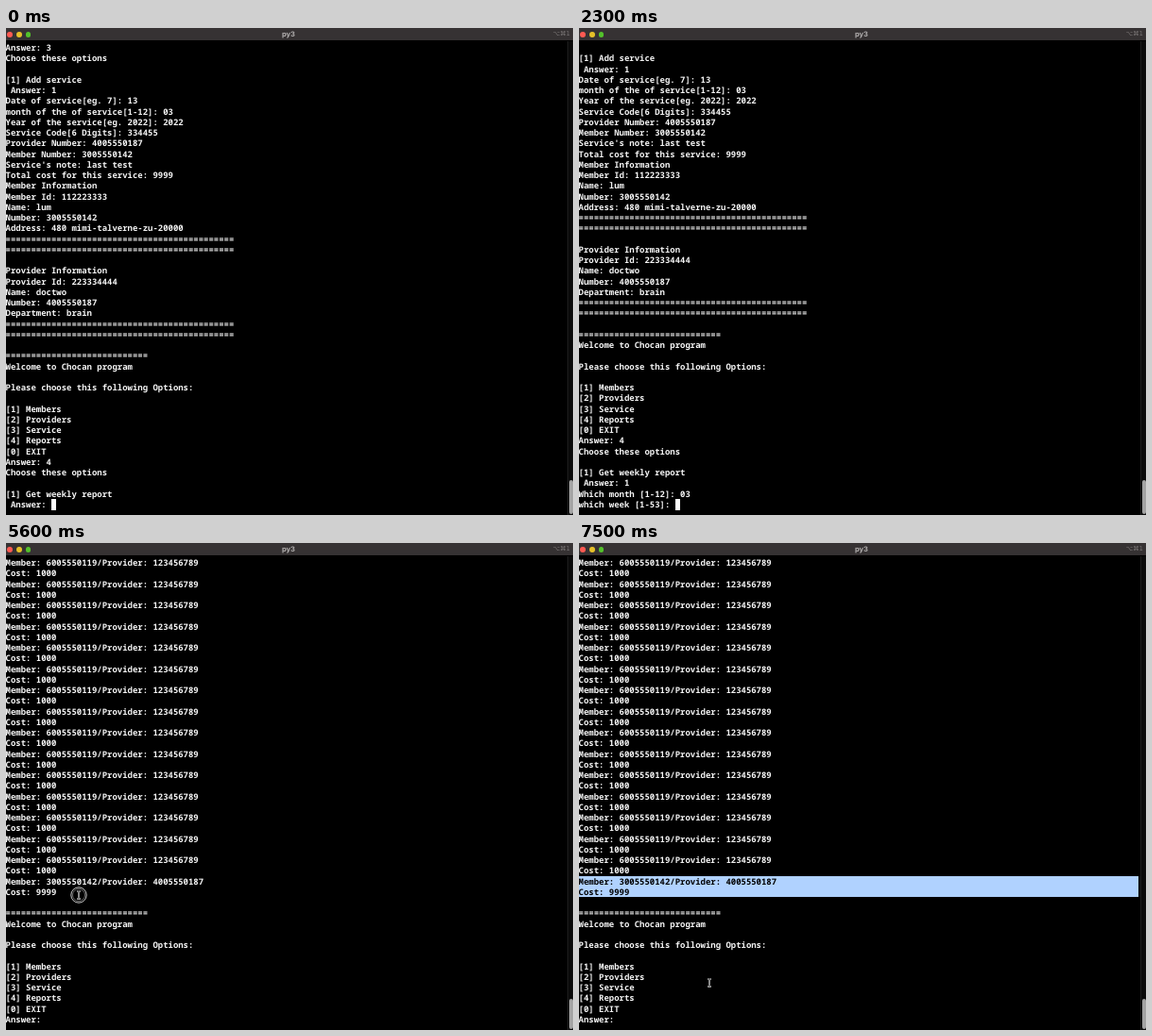
Write an HTML page that moves like this. It is 600x516 px and loops after 7600 ms.

```html
<!DOCTYPE html>
<html lang="en">
<head>
<meta charset="utf-8">
<title>py3</title>
<style>
  html, body { margin: 0; width: 600px; height: 516px; overflow: hidden; background: #000; }
  body { position: relative; text-rendering: geometricPrecision; }
  body > * { position: absolute; }
  #bar { left: 0; top: 0; width: 600px; height: 13px; background: #363233; font: 700 7.5px/13.5px Inter, Roboto, sans-serif; }
  #bar * { position: absolute; }
  #bar i { top: 4px; width: 5.8px; height: 5.8px; border-radius: 50%; }
  #bar b { left: 0; width: 598px; text-align: center; color: #b4b1b1; }
  #bar span { right: 3px; color: #7d7979; font: 6.5px/13.5px "DejaVu Sans", sans-serif; }
  #screen, #cursor { font: 600 8.96px/11.25px "Noto Sans Mono", "DejaVu Sans Mono", monospace; }
  #screen { left: 0; top: 15.2px; width: 592px; color: #f4f4f4; white-space: pre; }
  #screen div { height: 11.25px; text-indent: -.4px; }
  #screen .selected { background: #b0d2ff; color: #000; }
  #cursor { top: 499px; width: 1ch; height: 12px; margin-left: -.4px; background: #fff; }
  #track { left: 594px; top: 14px; width: 5px; height: 502px; background: #0a0a0a; border-left: 1px solid #1c1c1c; }
  #thumb { left: 596.4px; width: 3.6px; background: #a3a3a3; border-radius: 2px; }
  #pointer { left: -10px; top: -10px; width: 20px; height: 20px; fill: none; }
</style>
</head>
<body>
<div id="bar">
  <i style="left:1px;background:#fe5a52"></i>
  <i style="left:10.8px;background:#e6c029"></i>
  <i style="left:20.6px;background:#53c22b"></i>
  <b>py3</b><span>⌥⌘1</span>
</div>
<div id="screen"></div>
<div id="cursor"></div>
<div id="track"></div>
<div id="thumb"></div>
<svg id="pointer" viewBox="-10 -10 20 20">
  <g id="ring"><circle r="8.2" stroke="#c8c8c8"/><circle r="6.5" stroke="#8a8a8a" stroke-width=".8"/></g>
  <path id="halo" stroke="#d8d8d8" stroke-width="1.7"/>
  <path id="beam" stroke="#222" stroke-width=".6"/>
</svg>
<script>
const LOOP = 7600, STEP = 100, ROWS = 44;
const $ = id => document.getElementById(id);
const rule = '='.repeat(45);
const memberPhone = '3005550142', providerPhone = '4005550187';

const menu = `
${'='.repeat(28)}
Welcome to Chocan program

Please choose this following Options:

[1] Members
[2] Providers
[3] Service
[4] Reports
[0] EXIT
Answer: `;

const session = `Answer: 3
Choose these options

[1] Add service
 Answer: 1
Date of service[eg. 7]: 13
month of the of service[1-12]: 03
Year of the service[eg. 2022]: 2022
Service Code[6 Digits]: 334455
Provider Number: ${providerPhone}
Member Number: ${memberPhone}
Service's note: last test
Total cost for this service: 9999
Member Information
Member Id: 112223333
Name: lum
Number: ${memberPhone}
Address: 480 mimi-talverne-zu-20000
${rule}
${rule}

Provider Information
Provider Id: 223334444
Name: doctwo
Number: ${providerPhone}
Department: brain
${rule}
${rule}
${menu}4
Choose these options

[1] Get weekly report
 Answer: `;

const entry = (member, provider, cost) => `Member: ${member}/Provider: ${provider}\nCost: ${cost}\n`;
const report = entry('6005550119', '123456789', 1000).repeat(15)
  + entry(memberPhone, providerPhone, 9999) + menu;

// Terminal output: [time, text appended]
const output = [
  [0, session], [200, '1'], [300, '\nWhich month [1-12]: '], [2100, '03'],
  [2300, '\nwhich week [1-53]: '], [3200, '1'], [3300, '0'], [4000, '\n' + report]
];
const cursorOff = [[1300, 1800], [5200, 5700], [6200, 6800], [7400, LOOP]];
// Pointer path: [time, x, y]
const path = [
  [4700, 129, 512], [5100, 98, 414], [5400, 79, 380], [5500, 77, 373], [5700, 77, 373],
  [6000, 80, 360], [6200, 82, 361], [6400, 86, 370], [6600, 87, 373], [6700, 87, 373],
  [7000, 136, 464], [7400, 136, 465], [7500, 138, 466], [LOOP, 138, 466]
];

const beamShape = 'M-2-4Q0-4 0-2.8Q0-4 2-4M0-3V3M-2 4Q0 4 0 2.8Q0 4 2 4';
$('halo').setAttribute('d', beamShape);
$('beam').setAttribute('d', beamShape);

const within = (t, from, to) => t >= from && t < to;

function pointerAt(t) {
  const i = path.findIndex(p => p[0] > t);
  const [t0, x0, y0] = path[i - 1], [t1, x1, y1] = path[i];
  const k = (t - t0) / (t1 - t0);
  return [x0 + (x1 - x0) * k, y0 + (y1 - y0) * k];
}

function render(t) {
  const text = output.filter(([at]) => at <= t).map(o => o[1]).join('');
  const lines = text.split('\n').slice(-ROWS);
  const firstSelected = t >= 5900 ? 30 : t >= 5700 ? 31 : ROWS;
  $('screen').replaceChildren(...lines.map((line, row) => {
    const div = document.createElement('div');
    div.textContent = line;
    if (row >= firstSelected && row <= 31) div.className = 'selected';
    return div;
  }));

  $('cursor').style.left = lines.at(-1).length + 'ch';
  $('cursor').hidden = cursorOff.some(([from, to]) => within(t, from, to));

  const thumbTop = t < 4000 ? 479 : 483;
  $('thumb').style.top = thumbTop + 'px';
  $('thumb').style.height = 515 - thumbTop + 'px';

  const shown = t >= path[0][0];
  $('pointer').style.display = shown ? '' : 'none';
  if (shown) {
    const [x, y] = pointerAt(t);
    $('pointer').style.transform = `translate(${x}px, ${y}px)`;
    $('ring').style.display = within(t, 5500, 6400) ? '' : 'none';
  }
}

let last = -1;
function tick() {
  const t = Math.floor(performance.now() % LOOP / STEP) * STEP;
  if (t !== last) render(last = t);
  requestAnimationFrame(tick);
}
tick();
</script>
</body>
</html>
```
